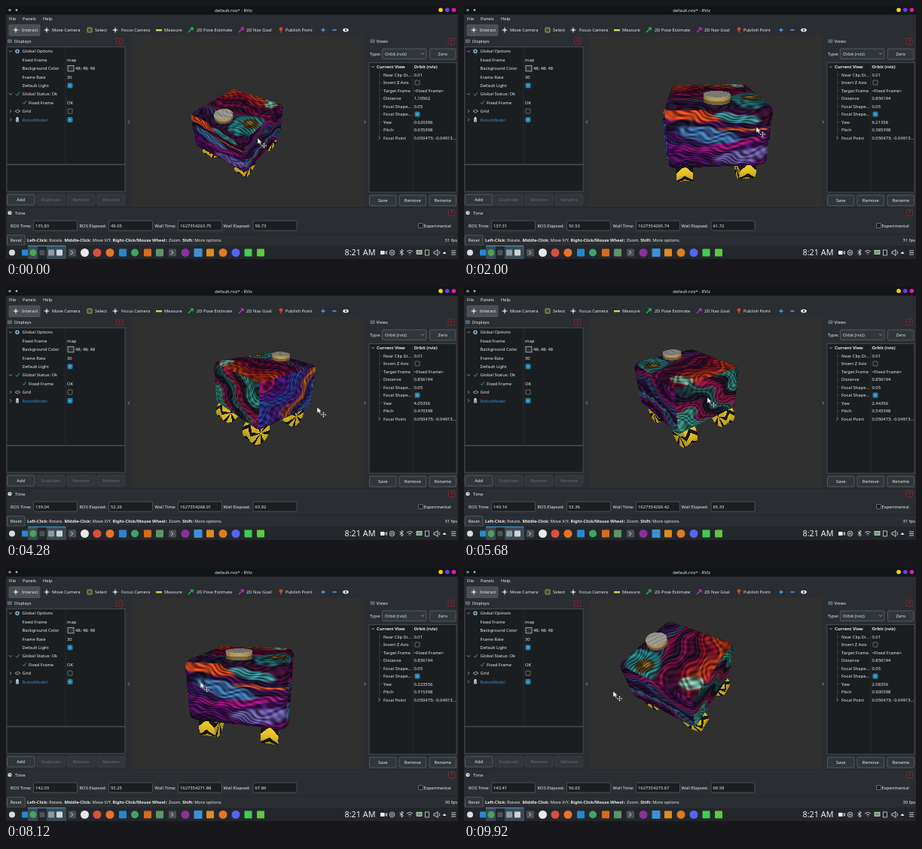
Write an HTML page with a canvas that moves like this. It is 600 px wide and 337 px high and loops after 10 s.

```html
<!DOCTYPE html>
<html lang="en">
<head>
<meta charset="utf-8">
<title>RViz</title>
<style>
  html, body { margin: 0; width: 100%; height: 100%; overflow: hidden; background: #2a2e32; }
  svg, canvas { position: absolute; left: 0; top: 0; }
  #view { left: 167px; top: 40px; }
  text { font-family: "Noto Sans", sans-serif; white-space: pre; }
</style>
</head>
<body>
<svg id="ui" width="600" height="337"></svg>
<canvas id="view" width="307" height="228"></canvas>
<svg width="600" height="337">
  <g id="cursor" fill="#fff" stroke="#222" stroke-width=".5">
    <path d="M0 0V8L2 6.3L3.5 9L4.8 8.4L3.6 5.8H6Z"/>
    <path d="M8.5 6L10 8H9V9.5H10.5V8.5L12.5 10L10.5 11.5V10.5H9V12H10L8.5 14L7 12H8V10.5H6.5V11.5L4.5 10L6.5 8.5V9.5H8V8H7Z"/>
  </g>
</svg>
<script>
const { sin, cos, abs, max, min, hypot, floor, round, PI } = Math;
const $ = id => document.getElementById(id);

// ---------- interface ----------
const LIGHT = '#eceeef', DIM = '#6b6f73', EDGE = '#55595d', DARK = '#1b1e20', BLUE = '#3daee9';
let markup = '';
const add = s => { markup += s; };
const rect = (x, y, w, h, fill, stroke = 'none', r = 0) =>
  add(`<rect x="${x}" y="${y}" width="${w}" height="${h}" rx="${r}" fill="${fill}" stroke="${stroke}" stroke-width=".7"/>`);
const dot = (x, y, r, fill) => add(`<circle cx="${x}" cy="${y}" r="${r}" fill="${fill}"/>`);
const line = (d, stroke = LIGHT, w = .8) => add(`<path d="${d}" fill="none" stroke="${stroke}" stroke-width="${w}"/>`);
const text = (x, y, s, { fill = LIGHT, bold, size = 5.8, anchor = 'start', id = '' } = {}) =>
  add(`<text id="${id}" x="${x}" y="${y + size * .36}" fill="${fill}" font-size="${size}" font-weight="${bold ? 700 : 400}" text-anchor="${anchor}">${s}</text>`);
const button = (x, y, w, label, fill = LIGHT) => {
  rect(x, y, w, 14, '#31363b', fill === DIM ? '#43474b' : '#656a6e', 1.5);
  text(x + w / 2, y + 7, label, { fill, anchor: 'middle' });
};
const check = (x, y, on) => {
  rect(x - 3, y - 3, 6, 6, on ? '#1d5f80' : DARK, on ? BLUE : '#8a8e91', .8);
  if (on) rect(x - 1.7, y - 1.7, 3.4, 3.4, BLUE);
};
const arrow = (x, y, open) => line(open ? `M${x - 2} ${y - 1}l2 2l2 -2` : `M${x - 1} ${y - 2}l2 2l-2 2`, '#bfc2c4', .7);
const panelHead = (x, y, label, closeX) => {
  text(x + 6, y, label);
  rect(closeX - 4, y - 4, 8, 8, '#3a2428', '#843640', 1);
  text(closeX, y, '?', { fill: '#da4453', anchor: 'middle', size: 5 });
};

function drawChrome() {
  rect(0, 0, 600, 11.5, '#111518');
  dot(5, 5.5, 1.8, '#7c8a90');
  dot(14, 5.5, 1.4, '#aab2b6');
  text(302, 5.5, 'default.rviz* - RViz', { anchor: 'middle' });
  ['#f5d400', '#6a3fe8', '#e818a0'].forEach((c, i) => dot(577 + 8.7 * i, 5.3, 2.8, c));
  [[4, 'File'], [22, 'Panels'], [49, 'Help']].forEach(([x, s]) => text(x, 17, s));

  rect(4, 25, 41, 14.5, '#4b4f53', '#5d6266', 1);
  const tools = [[13, 21, 'Interact', '#d5d7d8'], [54, 61, 'Move Camera', '#cfd2d4'], [111, 118, 'Select', '#d6cf6b'],
    [145, 153, 'Focus Camera', '#d5d7d8'], [203, 210, 'Measure', '#d8d25a'], [245, 253, '2D Pose Estimate', '#2fc24a'],
    [312, 319, '2D Nav Goal', '#d62bc8'], [365, 371, 'Publish Point', '#d8452c']];
  tools.forEach(([ix, x, label, c], i) => {
    if (i > 4 && i < 7) line(`M${ix - 3} 35l6 -6m-3.6 0h3.6v3.6`, c, 1.2);
    else if (i === 2) rect(ix - 3, 29, 6, 6, '#4d4a2b', c, .5);
    else if (i === 4) rect(ix - 4, 31, 8, 2.4, c);
    else if (i === 7) { dot(ix, 30.6, 2.3, c); line(`M${ix} 31v4.5`, c, 1.3); }
    else { line(`M${ix - 3.5} 32h7M${ix} 28.5v7`, c, 1); dot(ix, 32, 1.7, c); }
    text(x, 32, label);
  });
  line('M418.5 32h5M421 29.5v5M433.5 32h5', '#5a9df0', 1.3);
  add(`<ellipse cx="451" cy="32" rx="3.8" ry="2.3" fill="${LIGHT}"/>`);
  dot(451, 32, 1.2, '#333');
}

function drawDisplays() {
  rect(2.5, 45, 5, 3.6, '#4a5c68', '#788890');
  panelHead(5, 47, 'Displays', 150.5);
  rect(1, 54.5, 157, 156.5, DARK, EDGE);
  rect(1, 211.5, 157, 35.5, DARK, EDGE);
  line('M79 55V210.5', '#33373a', .6);
  const rows = [[0, 'Global Options', ''], [1, 'Fixed Frame', 'map'], [1, 'Background Color', '48; 48; 48'], [1, 'Frame Rate', '30'],
    [1, 'Default Light', true], [0, 'Global Status: Ok', ''], [2, 'Fixed Frame', 'OK'], [0, 'Grid', false], [0, 'RobotModel', true]];
  rows.forEach(([depth, label, value], i) => {
    const y = 60.3 + 11.4 * i, tick = i === 5 || i === 6;
    if (!depth) arrow(6, y, i < 7);
    if (tick) line(`M${depth ? 22 : 13} ${y}l1.8 2l3 -4.5`, '#2fae3c', 1);
    else if (i === 0) { dot(15, y, 2.8, '#7fa6c4'); dot(15, y, 1.1, DARK); }
    else if (i === 7) { line(`M12 ${y}l4 -2l3 2l-4 2z`, '#b9bdc0', .8); }
    else if (i === 8) { rect(13, y - 1.5, 4, 4.5, '#a0a8ad'); dot(15, y - 2.2, 1.5, '#d0d5d8'); }
    text(depth === 2 ? 30 : 21.5, y, label, { fill: i === 8 ? '#2f8fdc' : LIGHT });
    if (typeof value === 'boolean') check(85, y, value);
    else text(i === 2 ? 92 : 81, y, value);
    if (i === 2) rect(82, y - 3.8, 8, 7.6, '#303030', '#d0d2d3');
  });
  button(1.5, 251, 36.5, 'Add');
  [[41, 'Duplicate'], [81, 'Remove'], [121, 'Rename']].forEach(([x, s]) => button(x, 251, 37, s, DIM));
  line('M164 152.5l-2 2l2 2M475.5 152.5l2 2l-2 2', '#bfc2c4', .7);
}

function drawViews() {
  rect(484, 45, 5, 3.6, '#4a5c68', '#788890');
  panelHead(485.5, 47, 'Views', 591);
  text(483, 63.5, 'Type:');
  rect(499.5, 57, 58.5, 13.5, '#31363b', '#656a6e', 1.5);
  text(503, 63.5, 'Orbit (rviz)');
  arrow(553, 63.5, true);
  button(562.5, 57, 34.5, 'Zero');
  rect(482, 75.5, 116, 172.5, DARK, EDGE);
  line('M540 76V247.5', '#33373a', .6);
  line('M495.5 86V175.5', '#4a4e51', .5);
  const rows = [['Current View', 'Orbit (rviz)'], ['Near Clip Di...', '0.01'], ['Invert Z Axis', false], ['Target Frame', '&lt;Fixed Frame&gt;'],
    ['Distance', '', 'dist'], ['Focal Shape...', '0.05'], ['Focal Shape...', true], ['Yaw', '', 'yaw'], ['Pitch', '', 'pitch'],
    ['Focal Point', '0.050473; -0.04913...']];
  rows.forEach(([label, value, id], i) => {
    const y = 81 + 10.52 * i, bold = i === 0;
    if (i % 9 === 0) arrow(i ? 495.5 : 487, y, !i);
    else line(`M495.5 ${y}h4`, '#4a4e51', .5);
    text(bold ? 492 : 501, y, label, { bold });
    if (typeof value === 'boolean') check(546, y, value);
    else text(541.5, y, value, { bold, id });
  });
  [[482.5, 'Save'], [522, 'Remove'], [562, 'Rename']].forEach(([x, s]) => button(x, 252, 35.5, s));
}

function drawBottom() {
  line('M0 268.5H600M0 304H600', '#202427', .7);
  dot(5, 275.5, 2.6, '#d6d8d9');
  line('M5 274v1.7h1.3', '#333', .6);
  panelHead(6, 275.5, 'Time', 591.5);
  [[6, 'ROS Time:', 36.5, 'ros'], [97.5, 'ROS Elapsed:', 136.5, 'rosRun'], [197.5, 'Wall Time:', 228.5, 'wall'], [288.5, 'Wall Elapsed:', 328, 'wallRun']]
    .forEach(([x, label, bx, id]) => {
      text(x, 292.5, label);
      rect(bx, 286, 58, 13, DARK, '#5d6266', 1.5);
      text(bx + 2.5, 292.5, '', { id });
    });
  check(550.5, 292.5, false);
  text(554.5, 292.5, 'Experimental');
  button(1.5, 305, 23.5, 'Reset');
  const b = s => `<tspan font-weight="700">${s}</tspan>`;
  text(28, 312, `${b('Left-Click:')} Rotate. ${b('Middle-Click:')} Move X/Y. ${b('Right-Click/Mouse Wheel:')}: Zoom. ${b('Shift:')} More options.`, { size: 5.6 });
  text(599, 312, '', { anchor: 'end', id: 'fps' });

  rect(0, 319, 600, 18, '#23272b');
  [[29, 13], [54, 26]].forEach(([x, w]) => rect(x, 319.5, w, 17.5, '#3b4a55'));
  line('M29 319.6H79', BLUE, .9);
  // [x, radius, colour]; a negative radius makes a square
  [[8, 4, '#d9dcde'], [25, -4, '#2489d0'], [36, 4.5, '#4aa35a'], [48, -3.5, '#4c5257'], [60, -4, '#8c9aa5'], [71, -4, '#cfd4d7'],
    [88, -5, '#4b5054'], [104.5, 5.5, '#e8e8e8'], [121, 5.5, '#d8503c'], [138, 5.5, '#e8742a'], [155, -5, '#2489d0'], [171, 5, '#3fa565'],
    [188, -5, '#d96a1e'], [204, -5, '#5f9468'], [221, -5, '#4b5054'], [238, 5.5, '#8b2fa0'], [255, -5.5, '#3f8fd6'], [271, -5, '#e08b1e'],
    [288, 5.5, '#e07b22'], [305, 5.5, '#5865f2'], [321.5, -5, '#41cd52'], [338, -5, '#5fc83f']].forEach(([x, r, c]) =>
    r > 0 ? dot(x, 328.5, r, c) : rect(x + r, 328.5 + r, -2 * r, -2 * r, c, 'none', 1));
  [88, 221].forEach(x => line(`M${x - 2} 326l3 2.5l-3 2.5`));
  text(449.5, 328.5, '8:21 AM', { size: 10.8 });
  rect(497, 326, 5.5, 5, LIGHT); line('M503 328.5l2.5 -2v4z');
  add(`<circle cx="512.5" cy="328.5" r="3.3" fill="none" stroke="${LIGHT}" stroke-width=".8"/>`);
  line('M511.5 327v3M513.5 327v3M525 325v7l2.5 -2l-5 -4m0 4l5 -4l-2.5 -2');
  line('M532 327q4 -3 8 0M534 329q2 -1.5 4 0M536 330.5v1');
  rect(545, 325.5, 7, 5, '#6f9a70', LIGHT); rect(556.5, 325, 5, 7, 'none', LIGHT);
  line('M568 327h2l3 -2.5v8l-3 -2.5h-2zM575 326.5q1.5 2 0 4M591 326h6M591 328.5h6M591 331h6');
  add(`<path d="M579.5 330l2.5 -3l2.5 3z" fill="${LIGHT}"/>`);
}
drawChrome(); drawDisplays(); drawViews(); drawBottom();
$('ui').innerHTML = markup;

// ---------- robot ----------
const W = 307, H = 228, FOCAL = 275;
const ctx = $('view').getContext('2d');
const image = ctx.createImageData(W, H);
const rgb = s => [0, 2, 4].map(i => parseInt(s.substr(i, 2), 16));
// Bands of colour run along (dx, dy); spots are [u, v, width, height, tilt, colour]
const skin = (dx, dy, seed, colours, spots = []) => ({ dx, dy, seed, colours: colours.split(' ').map(rgb),
  spots: spots.map(([u, v, w, h, tilt, c]) => ({ u, v, w, h, tilt, c: rgb(c) })) });
const skins = {
  front: skin(-.1, 1, 1, '3a1030 2a1238 4a1258 1c1430 42145c 2a1a48 6a1070 3a0f50 521260 2a1038', [
    [.2, .12, .36, .12, .2, 'd8481f'], [.66, .12, .24, .09, .1, '3a9098'], [.75, .31, .34, .03, -.05, 'c8502a'],
    [.42, .42, .36, .12, .25, '3f70a8'], [.72, .74, .32, .14, -.25, '6a5ca8'], [.55, .57, .55, .06, -.3, '98147c']]),
  back: skin(.6, .6, 4, '1d3b40 2f8a80 2a1428 901848 24605c 1c1a2c 7a1445 388a7c'),
  left: skin(.75, .5, 2, '2f8070 8c1262 471a80 2c3a98 4a2080 b8582a 2b2460 3a4fa0'),
  right: skin(.08, .9, 5, '5a1258 281038 8a1660 2c4070 33103f 3a6a8c 6a1260 24102c 5a1c6c'),
  top: skin(.95, .15, 3, 'a82a1c b83a1f 8a1430 3a1030 88124a 241a30 7c1048 2b4a5c 431458 2a1a38', [
    [.75, .85, .26, .2, 0, '2a8c90'], [.13, .8, .14, .13, .3, '82b9a5'], [.7, .86, .12, .12, 0, '54401c'], [.69, .84, .05, .05, 0, 'a07838']]),
};
const out = [0, 0, 0];
const paint = (c, k = 1) => { for (let i = 0; i < 3; i++) out[i] = c[i] * k; };
const blend = (c, f) => { for (let i = 0; i < 3; i++) out[i] += (c[i] - out[i]) * f; };

function marble({ dx, dy, seed, colours, spots }, u, v) {
  const warp = .1 * sin(5 * u + seed) + .06 * sin(9 * v - 6 * u + seed * 2) + .025 * sin(23 * u + 17 * v);
  const s = u * dx + v * dy + warp;
  const p = max(0, min(.999, s)) * (colours.length - 1), i = floor(p);
  paint(colours[i]);
  blend(colours[i + 1], max(0, min(1, (p - i - .3) * 2.5)));
  for (const o of spots) {
    const a = u - o.u, b = v - o.v + warp * .4 * (o.h < o.w);
    const r = hypot((a + b * o.tilt) / o.w, (b - a * o.tilt) / o.h);
    if (r < 1) blend(o.c, min(1, (1 - r) * 4));
  }
  const ink = .82 + .28 * sin(s * 95 + 5 * sin(7 * u + 4 * v + seed)) + .16 * sin(60 * u - 45 * v + 6 * sin(9 * s));
  paint(out, ink);
}

// Box centre and half sizes, relative to the camera's focal point
const BX = .1025, BY = .021, BZ = .046, HX = .159, HY = .157, HZ = .1, ROUND = .026;
const cylinder = (radial, axial) => min(max(radial, axial), 0) + hypot(max(radial, 0), max(axial, 0));
const bodyDist = (x, y, z) => {
  const a = abs(x - BX) - HX + ROUND, b = abs(y - BY) - HY + ROUND, c = abs(z - BZ) - HZ + ROUND;
  const A = max(a, 0), B = max(b, 0), C = max(c, 0);
  return Math.sqrt(A * A + B * B + C * C) + min(max(a, b, c), 0) - ROUND;
};
const lidarDist = (x, y, z) => cylinder(hypot(x - .2, y - .02) - .039, abs(z - .152) - .016);
const wheelDist = (x, y, z) => cylinder(hypot(abs(x - .085) - .105, z + .085) - .049, abs(abs(y - .02) - .103) - .026);
const scene = (x, y, z) => min(bodyDist(x, y, z), lidarDist(x, y, z), wheelDist(x, y, z));

function surface(x, y, z, nx, ny, nz) {
  const body = bodyDist(x, y, z), lidar = lidarDist(x, y, z), wheel = wheelDist(x, y, z);
  if (lidar < body && lidar < wheel) {
    if (nz > .7) paint([172, 168, 158], 1 + .15 * sin(x * 1500) * sin(y * 1500));
    else paint([176, 150, 92], z > .157 ? 1 : .65);
  } else if (wheel < body) {
    const wy = abs(abs(y - .02) - .103), angle = Math.atan2(z + .085, abs(x - .085) - .105);
    paint(sin(angle * 6 + wy * 110) > -.45 ? [226, 192, 38] : [24, 22, 14]);
  } else {
    const u = (x - BX) / HX / 2 + .5, v = (y - BY) / HY / 2 + .5, w = .5 - (z - BZ) / HZ / 2;
    if (nz > .7) marble(skins.top, u, v);
    else if (abs(nx) > abs(ny)) marble(nx > 0 ? skins.front : skins.back, v, w);
    else marble(ny > 0 ? skins.right : skins.left, u, w);
  }
}

function renderRobot(yaw, pitch, dist) {
  const cy = cos(yaw), sy = sin(yaw), cp = cos(pitch), sp = sin(pitch);
  const nx = cy * cp, ny = sy * cp, nz = sp;
  const ox = nx * dist, oy = ny * dist, oz = nz * dist;
  const mx = .1 - ox, my = .02 - oy, mz = .02 - oz, R = .26, E = .001;
  for (let j = 0, k = 0; j < H; j++) for (let i = 0; i < W; i++, k += 4) {
    const a = (i + .5 - W / 2) / FOCAL, b = (H / 2 - j - .5) / FOCAL, len = Math.sqrt(1 + a * a + b * b);
    const dx = (-nx - sy * a - cy * sp * b) / len, dy = (-ny + cy * a - sy * sp * b) / len, dz = (-nz + cp * b) / len;
    const along = mx * dx + my * dy + mz * dz;
    out[0] = out[1] = out[2] = 48;
    if (mx * mx + my * my + mz * mz - along * along < R * R) {
      let t = along - R;
      for (let n = 0; n < 40 && t < along + R; n++) {
        const x = ox + dx * t, y = oy + dy * t, z = oz + dz * t, d = scene(x, y, z);
        if (d < 8e-4) {
          let gx = scene(x + E, y, z) - d, gy = scene(x, y + E, z) - d, gz = scene(x, y, z + E) - d;
          const g = hypot(gx, gy, gz) || 1;
          gx /= g; gy /= g; gz /= g;
          surface(x, y, z, gx, gy, gz);
          paint(out, .6 + .46 * max(0, -(gx * dx + gy * dy + gz * dz)));
          break;
        }
        t += d;
      }
    }
    for (let c = 0; c < 3; c++) image.data[k + c] = out[c];
    image.data[k + 3] = 255;
  }
  ctx.putImageData(image, 0, 0);
}

// ---------- motion ----------
// seconds, yaw steps, pitch steps, pointer x, pointer y; the pointer goes back between drags
const drags = [[0, 0, 0, 334, 176], [2, 138, -50, 388, 161], [2.6, 269, -50, 429, 161], [3, 269, -50, 319, 155],
  [4.28, 570, -33, 413, 160], [4.7, 672, -28, 445, 162], [5, 672, -28, 256, 140], [5.68, 892, -18, 323, 147],
  [7.32, 1290, -57, 494, 131], [7.7, 1290, -57, 245, 154], [8.12, 1336, -64, 258, 152], [9, 1148, -4, 199, 171],
  [9.3, 1148, -4, 256, 146], [9.92, 964, 53, 198, 164]];
// seconds, ROS time, wall time, wall elapsed
const clocks = [[0, 135.83, 263.75, 59.73], [2, 137.31, 265.74, 61.72], [4.28, 139.04, 268.01, 63.92], [5.68, 140.14, 269.42, 65.33],
  [7.32, 141.37, 271.06, 67.04], [8.12, 142.03, 271.88, 67.86], [9.92, 143.41, 273.67, 69.59]];

function at(keys, t) {
  const i = max(1, keys.findIndex(k => k[0] >= t)), [a, b] = [keys[i - 1], keys[i]];
  const f = (t - a[0]) / (b[0] - a[0]);
  return a.map((v, c) => v + (b[c] - v) * f).slice(1);
}

let shown = -1;
function tick() {
  // 15 pictures a second, held to a 40 ms grid
  const step = floor(.6 * floor(performance.now() % 10000 / 40) + .3);
  if (step !== shown) {
    shown = step;
    const t = round(step * 5 / 3) / 25;
    const [turn, tilt, px, py] = at(drags, t), [ros, wall, run] = at(clocks, t);
    const n = round(turn), drift = n > 300 ? 25e-6 : 0;
    const yaw = (.620396 - .005 * n - drift + 4 * PI) % (2 * PI);
    const pitch = .635398 + .005 * round(tilt);
    const dist = t < 1.28 ? 1.10562 : t < 1.4 ? .972946 : .856194;
    const slow = (t > .6 && t < 1.6) || (t > 7 && t < 8.3) || t > 9.1;
    const values = { ros: ros.toFixed(2), rosRun: (ros - 86.782).toFixed(2), wall: (1627354000 + wall).toFixed(2), wallRun: run.toFixed(2),
      dist: +dist.toPrecision(6), yaw: +yaw.toPrecision(6), pitch: +pitch.toPrecision(6), fps: slow ? '30 fps' : '31 fps' };
    for (const id in values) $(id).textContent = values[id];
    $('cursor').setAttribute('transform', `translate(${px} ${py})`);
    renderRobot(yaw, pitch, dist);
  }
  requestAnimationFrame(tick);
}
tick();
</script>
</body>
</html>
```
